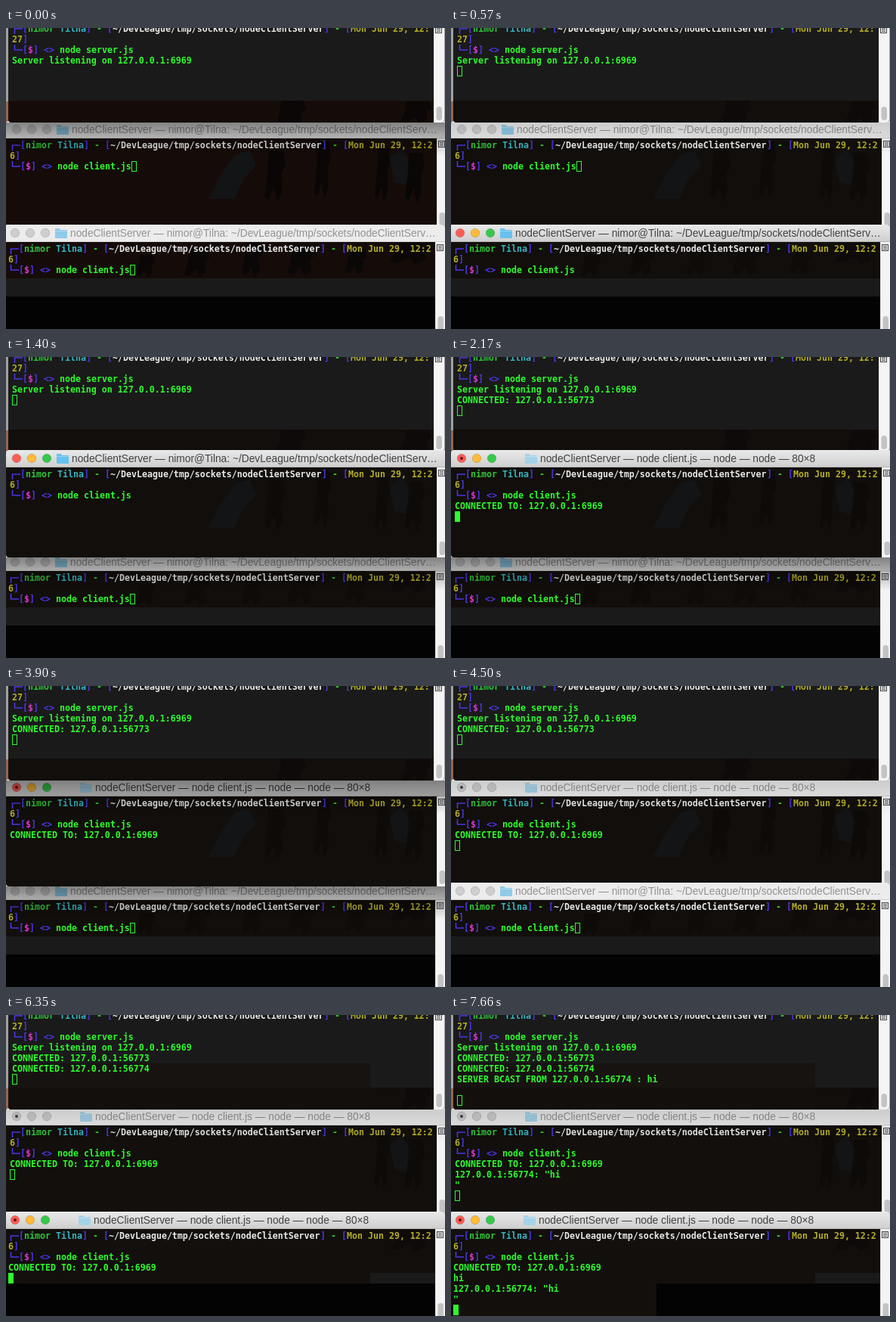
An HTML page for the animation above (8 s loop, 581 by 398 pixels).

```html
<!DOCTYPE html>
<html lang="en">
<head>
<meta charset="utf-8">
<title>Terminal windows</title>
<style>
  html, body { margin: 0; width: 100%; height: 100%; overflow: hidden; background: #d8d8d8; }
  svg { display: block; width: 100vw; height: 100vh; }
  text { white-space: pre; }
  .mono { font: bold 11.627px "DejaVu Sans Mono", "Liberation Mono", monospace; }
  .bar { font: 13.75px "Liberation Sans", Arial, sans-serif; }
</style>
</head>
<body>
<svg id="stage" viewBox="0 0 581 398" preserveAspectRatio="none"></svg>
<script>
const LOOP = 8000, COL = 7, ROW = 14;
const GREEN = '#2dfb2d', BLUE = '#4b36e6', DATE = '#b4ae28';
const USER = 'nimor', HOST = 'Tilna';
const DIR = '~/DevLeague/tmp/sockets/nodeClientServer';
const SHELL = `nodeClientServer — ${USER}@${HOST}: ~/DevLeague/tmp/sockets/nodeClientServ…`;
const STARTING = 'nodeClientServer — node client.js — node — zsh — 80×8';
const RUNNING = 'nodeClientServer — node client.js — node — node — 80×8';

// Geometry: top of title bar, of body, bottom, edges, scrollbar, first text cell
const wins = {
  1: { top: -30, body: -20, end: 125, left: 3, right: 580, bar: 566, tx: 8, ty: -6,
       cols: 79, minute: '27', icon: -2, thumb: [104, 18] },
  2: { top: 123, body: 146, end: 265, left: 0, right: 583, bar: 570, tx: 5, ty: 148,
       cols: 80, minute: '26', icon: 149, thumb: [244, 18] },
  3: { top: 260, body: 283, end: 402, left: -2, right: 581, bar: 568, tx: 3, ty: 285,
       cols: 80, minute: '26', icon: 286, thumb: [381, 20] }
};

const server = ['node server.js', 'Server listening on 127.0.0.1:6969'];
const first = 'CONNECTED: 127.0.0.1:56773', second = 'CONNECTED: 127.0.0.1:56774';
const run = 'node client.js', joined = 'CONNECTED TO: 127.0.0.1:6969';
const reply = ['127.0.0.1:56774: "hi', '"', ''];

// Each step changes part of the state; the rest carries over
const steps = [
  [0, { order: [2, 3, 1], active: 1, wall: 0,
        cur: { 1: '', 2: 'box', 3: 'box' },
        out: { 1: [...server, ''], 2: [run], 3: [run] },
        title: { 2: SHELL, 3: SHELL } }],
  [420, { order: [2, 1, 3], cur: { 1: 'box' } }],
  [500, { active: 0, wall: 1 }],
  [570, { active: 3, cur: { 3: '' } }],
  [1220, { active: 0, cur: { 3: 'box' } }],
  [1300, { order: [1, 3, 2] }],
  [1400, { active: 2, cur: { 2: '' } }],
  [1450, { cur: { 2: 'full' } }],
  [1870, { cur: { 2: '' } }],
  [2050, { out: { 2: [run, ''] }, title: { 2: STARTING }, cur: { 2: 'full' } }],
  [2110, { out: { 1: [...server, first, ''], 2: [run, joined, ''] } }],
  [2170, { title: { 2: RUNNING } }],
  [2890, { cur: { 2: '' } }],
  [3370, { cur: { 2: 'full' } }],
  [3900, { order: [3, 2, 1], cur: { 2: '' } }],
  [4020, { active: 1, cur: { 1: '', 2: 'box' } }],
  [4500, { order: [2, 1, 3], active: 0, cur: { 1: 'box' } }],
  [4620, { active: 3, cur: { 3: '' } }],
  [5100, { out: { 3: [run, ''] }, title: { 3: STARTING }, cur: { 3: 'full' }, wall: 2 }],
  [5210, { out: { 1: [...server, first, second, ''], 3: [run, joined, ''] },
           title: { 3: RUNNING }, wall: 3 }],
  [5870, { cur: { 3: '' } }],
  [6350, { cur: { 3: 'full' } }],
  [6830, { out: { 3: [run, joined, 'h'] } }],
  [6950, { out: { 3: [run, joined, 'hu'] } }],
  [7250, { out: { 3: [run, joined, 'h'] } }],
  [7370, { out: { 3: [run, joined, 'hi'] } }],
  [7610, { out: { 1: [...server, first, second, 'SERVER BCAST FROM 127.0.0.1:56774 : hi', '', ''],
                  3: [run, joined, 'hi', ''] }, wall: 4 }],
  [7660, { out: { 2: [run, joined, ...reply], 3: [run, joined, 'hi', ...reply] } }]
];

const states = [];
for (const [time, change] of steps) {
  const last = states[states.length - 1] || {};
  const next = { ...last, ...change, time };
  for (const key of ['cur', 'out', 'title']) next[key] = { ...last[key], ...change[key] };
  states.push(next);
}

const esc = s => s.replace(/&/g, '&amp;').replace(/</g, '&lt;').replace(/>/g, '&gt;');
const rect = (x, y, w, h, fill, more = '') =>
  `<rect x="${x}" y="${y}" width="${w}" height="${h}" fill="${fill}" ${more}/>`;
const poly = (points, fill) => `<polygon points="${points}" fill="${fill}"/>`;
const circle = (x, y, r, fill, more = '') =>
  `<circle cx="${x}" cy="${y}" r="${r}" fill="${fill}" ${more}/>`;

const defs = `<defs>
  <linearGradient id="lit" x2="0" y2="1"><stop stop-color="#e9e9e9"/><stop offset="1" stop-color="#cecece"/></linearGradient>
  <linearGradient id="shade" x2="0" y2="1"><stop stop-opacity=".45"/><stop offset="1" stop-opacity="0"/></linearGradient>
  ${Object.entries(wins).map(([n, w]) => `<clipPath id="clip${n}">
    ${rect(w.left, w.top, w.right - w.left, w.end - w.top, '#000', 'rx="4"')}</clipPath>`).join('')}
</defs>`;

// Dark rocks of the wallpaper: x, y, width, height
const rocks = [
  [356, 96, 42, 38], [522, 97, 42, 30], [342, 162, 28, 68], [408, 150, 22, 76],
  [488, 158, 20, 72], [528, 165, 26, 66], [172, 300, 26, 30], [236, 290, 34, 40],
  [312, 284, 28, 46], [372, 288, 38, 40], [448, 292, 30, 34], [508, 284, 56, 28]
];
const rock = ([x, y, w, h]) => poly(
  [[.2, 0], [.9, 0], [1, .3], [.8, .45], [.85, .8], [.6, 1], [.45, .7], [.2, .95], [0, .9], [.15, .4]]
    .map(([a, b]) => `${x + a * w},${y + b * h}`).join(' '), '#090707');

function wallpaper(kind) {
  const brown = kind ? '#120e0b' : '#150c09', band = kind > 1 ? 341 : 331;
  let s = rect(0, 0, 581, 96, '#1a1a1a') + rect(0, 96, 581, 245, brown);
  s += poly('268,226 284,194 304,167 322,162 331,182 314,200 302,226', '#131415');
  s += poly('508,172 524,160 536,180 530,208 514,204', '#131415');
  s += `<g opacity="${kind ? .4 : .85}">${rocks.map(rock).join('')}</g>`;
  s += rect(0, band, 581, 355 - band, '#1a1a1a') + rect(0, 355, 581, 43, '#040304');
  if (kind > 2) s += rect(0, 64, 482, 32, '#171311') + rect(0, 96, 482, 259, '#120f0c');
  if (kind > 3) s += rect(0, 355, 272, 43, '#120f0c');
  return s;
}

const mono = (w, col, row, str, fill) =>
  `<text class="mono" x="${w.tx + col * COL}" y="${w.ty + row * ROW + 11}" fill="${fill}">${esc(str)}</text>`;

function prompt(w) {
  const put = (col, row, str, fill) => mono(w, col, row, str, fill);
  const date = 'Mon Jun 29, 12:' + w.minute, split = w.cols - 64;
  const x = w.tx + 3.5, y = w.ty + 7;
  return `<path d="M${x} ${y + 7}V${y}H${x + 10.5}M${x} ${y + 21}V${y + 28}H${x + 10.5}" fill="none" stroke="${BLUE}" stroke-width="1.6"/>` +
    put(2, 0, '[', BLUE) + put(3, 0, USER, '#30c63a') + put(9, 0, HOST, '#35b5c2') +
    put(14, 0, ']', BLUE) + put(16, 0, '-', '#2fd02f') + put(18, 0, '[', BLUE) +
    put(19, 0, DIR, '#e8e8e8') + put(59, 0, ']', BLUE) + put(61, 0, '-', '#2fd02f') +
    put(63, 0, '[', BLUE) + put(64, 0, date.slice(0, split), DATE) +
    put(0, 1, date.slice(split), DATE) + put(date.length - split, 1, ']', BLUE) +
    put(2, 2, '[', BLUE) + put(3, 2, '$', '#d936cc') + put(4, 2, ']', BLUE) +
    put(6, 2, '<>', BLUE);
}

function cursor(w, lines, mode) {
  if (!mode) return '';
  const last = lines.length - 1;
  const x = w.tx + (lines[last].length + (last ? 0 : 9)) * COL;
  const y = w.ty + (last + 2) * ROW;
  return mode === 'full' ? rect(x, y, 7, 14, GREEN)
    : rect(x + .5, y + .5, 6, 13, 'none', `stroke="${GREEN}"`);
}

function titleBar(n, w, name, active) {
  const mid = w.body - 12, shift = n === 2 ? 2 : 0;
  const busy = name === RUNNING;
  const x = shift + (name === SHELL ? 85 : busy ? 116 : 121);
  const colors = active ? ['#fb5d56', '#fbbb36', '#36c84c'] : ['#cecece', '#cecece', '#cecece'];
  let s = rect(w.left, w.top, w.right - w.left, w.body - w.top, active ? 'url(#lit)' : '#ececec');
  s += rect(w.left, w.body - 1, w.right - w.left, 1, active ? '#b4b4b4' : '#d4d4d4');
  colors.forEach((c, i) => {
    s += circle(12 + shift + i * 20, mid, 5.8, c, 'stroke="#000" stroke-opacity=".14"');
  });
  if (busy) s += circle(12 + shift, mid, 2, active ? '#6d0f0c' : '#444');
  const fx = x - 20, fy = mid - 6;
  const tone = busy ? '#a4d3e8' : active ? '#66c2ef' : '#8fcbe8';
  s += `<path d="M${fx} ${fy + 1}q0-1 1-1h4.500l1.500 2h8q1 0 1 1v9q0 1-1 1h-14q-1 0-1-1z" fill="${tone}"/>`;
  s += rect(fx, fy + 3, 16, 1, '#fff', 'opacity=".3"');
  return s + `<text class="bar" x="${x}" y="${mid + 5}" fill="${active ? '#424242' : '#939393'}">${name}</text>`;
}

function scrollbar(w) {
  const x = w.bar, ix = x + 2, iy = w.icon;
  let s = rect(x, w.body, w.right - x, w.end - w.body, '#f4f4f4');
  s += rect(x, w.body, 1, w.end - w.body, '#e0e0e0');
  s += rect(ix + .5, iy + .5, 8, 8, '#eee', 'stroke="#444"');
  for (const dy of [2, 4, 6]) s += rect(ix + 2, iy + dy, 5, 1, '#555');
  return s + rect(x + 3.5, w.thumb[0], 7.5, w.thumb[1], '#c3c3c3', 'rx="3.7"');
}

function drawWindow(n, st) {
  const w = wins[n], lines = st.out[n];
  const front = st.active === n || st.order[2] === n;
  let s = rect(0, w.end, 581, 44, 'url(#shade)', `opacity="${front ? 1 : .3}"`);
  s += `<g clip-path="url(#clip${n})">` + wallpaper(st.wall) + prompt(w);
  lines.forEach((line, i) => { s += mono(w, i ? 0 : 9, i + 2, line, GREEN); });
  s += cursor(w, lines, st.cur[n]) + scrollbar(w);
  if (n > 1) s += titleBar(n, w, st.title[n], st.active === n);
  return s + '</g>';
}

const stage = document.getElementById('stage');
let shown = null;

function draw(time) {
  const st = states.filter(s => s.time <= time).pop();
  if (st === shown) return;
  shown = st;
  stage.innerHTML = defs + rect(0, 0, 581, 398, '#a0a0a0') + rect(0, 97, 4, 30, '#94664a') +
    st.order.map(n => drawWindow(n, st)).join('');
}

const start = performance.now();
function tick() {
  draw((performance.now() - start) % LOOP);
  requestAnimationFrame(tick);
}
tick();
</script>
</body>
</html>
```
